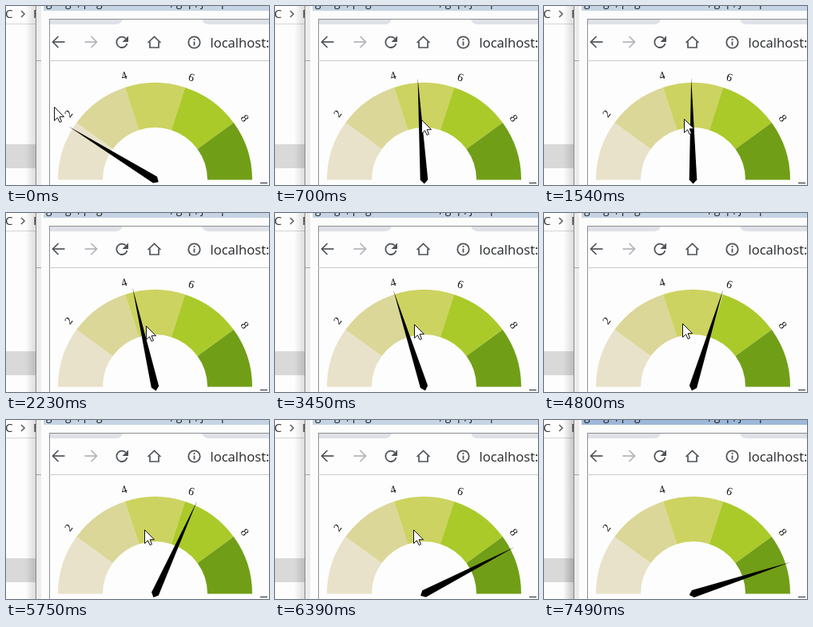
Write an HTML page with a canvas that moves like this. It is 329x224 px and loops after 7.55 s.

```html
<!DOCTYPE html>
<html lang="en">
<head>
<meta charset="utf-8">
<title>Gauge</title>
<style>
html, body { margin: 0; width: 100%; height: 100%; overflow: hidden; background: #fdfdfd; }
canvas { display: block; }
</style>
</head>
<body>
<canvas id="stage" width="329" height="224"></canvas>
<script>
const ctx = document.getElementById('stage').getContext('2d');
const LOOP = 7550, STEP = 135.9, FOCUS_AT = 7490, MOUSE_GONE = 6940;
const CX = 186.5, CY = 217.5, OUTER = 121.5, INNER = 65.5;
const rad = deg => deg * Math.PI / 180;
const mix = (a, b, k) => a + (b - a) * k;
const clamp = k => Math.max(0, Math.min(1, k));
const cubic = k => k < 0.5 ? 4 * k ** 3 : 1 - 4 * (1 - k) ** 3;
const backOut = k => 1 + 2.5 * (k - 1) ** 3 + 1.5 * (k - 1) ** 2;

// Each reading eases in over two seconds.
const readings = [{ at: -890, to: 5 }, { at: 1007, to: 4 }, { at: 3120, to: 6 }, { at: 5090, to: 9 }];
const needleValue = t =>
  readings.reduce((v, { at, to }) => mix(v, to, cubic(clamp((t - at) / 2000))), 0);

// A quick sweep to the dial, then a slow drift.
function mouseAt(t) {
  const sweep = backOut(clamp(t / 1050)), drift = clamp((t - 2300) / 3700);
  return [Math.floor(mix(60, 175, sweep) - 2 * drift), Math.floor(mix(126, 141, sweep) - 4 * drift)];
}

function rect(x, y, w, h, fill) {
  ctx.fillStyle = fill;
  ctx.fillRect(x, y, w, h);
}

function trace(points, close) {
  ctx.beginPath();
  points.forEach(([x, y]) => ctx.lineTo(x, y));
  if (close) ctx.closePath();
}

function fillShape(points, color) {
  trace(points, true);
  ctx.fillStyle = color;
  ctx.fill();
}

function line(points, color, close) {
  trace(points, close);
  ctx.strokeStyle = color;
  ctx.lineWidth = 1.7;
  ctx.stroke();
}

function ring(x, y, r, from, to, color) {
  ctx.beginPath();
  ctx.arc(x, y, r, rad(from), rad(to));
  ctx.strokeStyle = color;
  ctx.lineWidth = 1.8;
  ctx.stroke();
}

function text(str, x, y, font, color) {
  ctx.font = font;
  ctx.fillStyle = color;
  ctx.fillText(str, x, y);
}

// Runs paint with the origin at x, y, turned by deg.
function at(x, y, deg, paint) {
  ctx.save();
  ctx.translate(x, y);
  ctx.rotate(rad(deg));
  paint();
  ctx.restore();
}

function drawBackWindow(focused) {
  const ui = '15px "Open Sans", sans-serif';
  rect(0, 0, 38, 224, '#fdfdfd');
  text('C', -1, 15, ui, '#333');
  line([[19, 6], [23, 10], [19, 14]], '#666');
  text('F', 34, 15, ui, '#333');
  rect(0, 22, 38, 1, '#d5d5d5');
  rect(0, 173, 38, 30, '#d9d9d9');

  const shade = ctx.createLinearGradient(24, 0, 38, 0);
  shade.addColorStop(0, 'rgba(0,0,0,0)');
  shade.addColorStop(1, `rgba(0,0,0,${focused ? 0.24 : 0.14})`);
  rect(24, 0, 14, 224, shade);
  rect(37, 0, 1, 224, '#8a8a8a');

  rect(38, 0, 6, 224, '#ececec');
  rect(44, 0, 285, 224, '#fcfcfc');
  rect(38, 68, 6, 1, '#a5a5a5');
  rect(47, 0, 282, 6, focused ? '#9db7d8' : '#c6d4e3');
  text('gauge, page viewer: dial, gap, jump', 50, 0, '14px "Open Sans", sans-serif', '#222');
}

// Grey tab strip piece whose inner end curves away from the active tab.
function tabStrip(edge, end) {
  const dir = Math.sign(end - edge);
  ctx.fillStyle = '#dee1e6';
  ctx.beginPath();
  ctx.moveTo(edge, 16);
  ctx.quadraticCurveTo(edge + dir, 23, edge + dir * 9, 23);
  ctx.lineTo(end, 23);
  ctx.lineTo(end, 16);
  ctx.fill();
}

function arrow(x, dir, color) {
  line([[x, 45], [x - dir * 15, 45]], color);
  line([[x - dir * 7, 38], [x, 45], [x - dir * 7, 52]], color);
}

function drawBrowser() {
  const dark = '#4f5358';
  rect(54, 16, 275, 208, '#fdfdfd');
  tabStrip(146, 54);
  tabStrip(245, 329);
  rect(54, 16, 275, 1, '#8c8f94');
  rect(54, 16, 1, 208, '#8c8f94');
  rect(54, 68, 275, 1, '#c8cacd');

  arrow(58.5, -1, dark);
  arrow(113.5, 1, '#b0b3b7');
  ring(145, 45.3, 6.7, 15, 315, dark);
  fillShape([[153, 37.5], [153, 45], [145.5, 45]], dark);
  line([[177.5, 46], [185.5, 38.5], [193.5, 46]], dark);
  line([[180, 44.5], [180, 52], [191, 52], [191, 44.5]], dark);
  ring(235.5, 45.5, 7.2, 0, 360, dark);
  rect(234.6, 44.5, 1.8, 5, dark);
  rect(234.6, 41, 1.8, 1.9, dark);
  text('localhost:', 255.5, 52, '16.6px "Open Sans", "Noto Sans", sans-serif', '#26282b');
}

function drawDial() {
  for (let i = 0; i < 5; i++) {
    const k = i / 5, from = rad(180 + 36 * i), to = rad(216 + 36 * i);
    ctx.fillStyle = `hsl(${mix(48, 88.2, k)}, ${mix(39.5, 83, k)}%, ${mix(85.1, 23.1, k)}%)`;
    ctx.beginPath();
    ctx.arc(CX, CY, OUTER, from, to);
    ctx.arc(CX, CY, INNER, to, from, true);
    ctx.fill();
  }
  for (let v = 2; v < 10; v += 2) {
    at(CX, CY, 18 * v - 90, () => text(v, 0, -OUTER - 10, '14px "Liberation Serif", serif', '#111'));
  }
  rect(318, 221, 9, 1, '#223');
}

function drawNeedle(v) {
  at(CX, CY, 18 * v - 90, () => fillShape([[4.8, 0], [0, -127.5], [-4.8, 0], [0, 5]], '#000'));
}

function drawMouse([x, y]) {
  at(x + 0.5, y + 0.5, 0, () => {
    fillShape([[0, 0], [0, 17], [4, 13.3], [6.6, 19], [9, 18], [6.6, 12.2], [12, 12.2]], '#fff');
    ctx.strokeStyle = '#111';
    ctx.lineWidth = 1;
    ctx.stroke();
  });
}

function draw(now) {
  const time = now % LOOP;
  const t = Math.floor(time / STEP) * STEP;
  drawBackWindow(time >= FOCUS_AT);
  drawBrowser();
  drawDial();
  drawNeedle(needleValue(t));
  if (t < MOUSE_GONE) drawMouse(mouseAt(t));
}

const begin = performance.now();
function loop() {
  draw(performance.now() - begin);
  requestAnimationFrame(loop);
}
loop();
</script>
</body>
</html>
```
